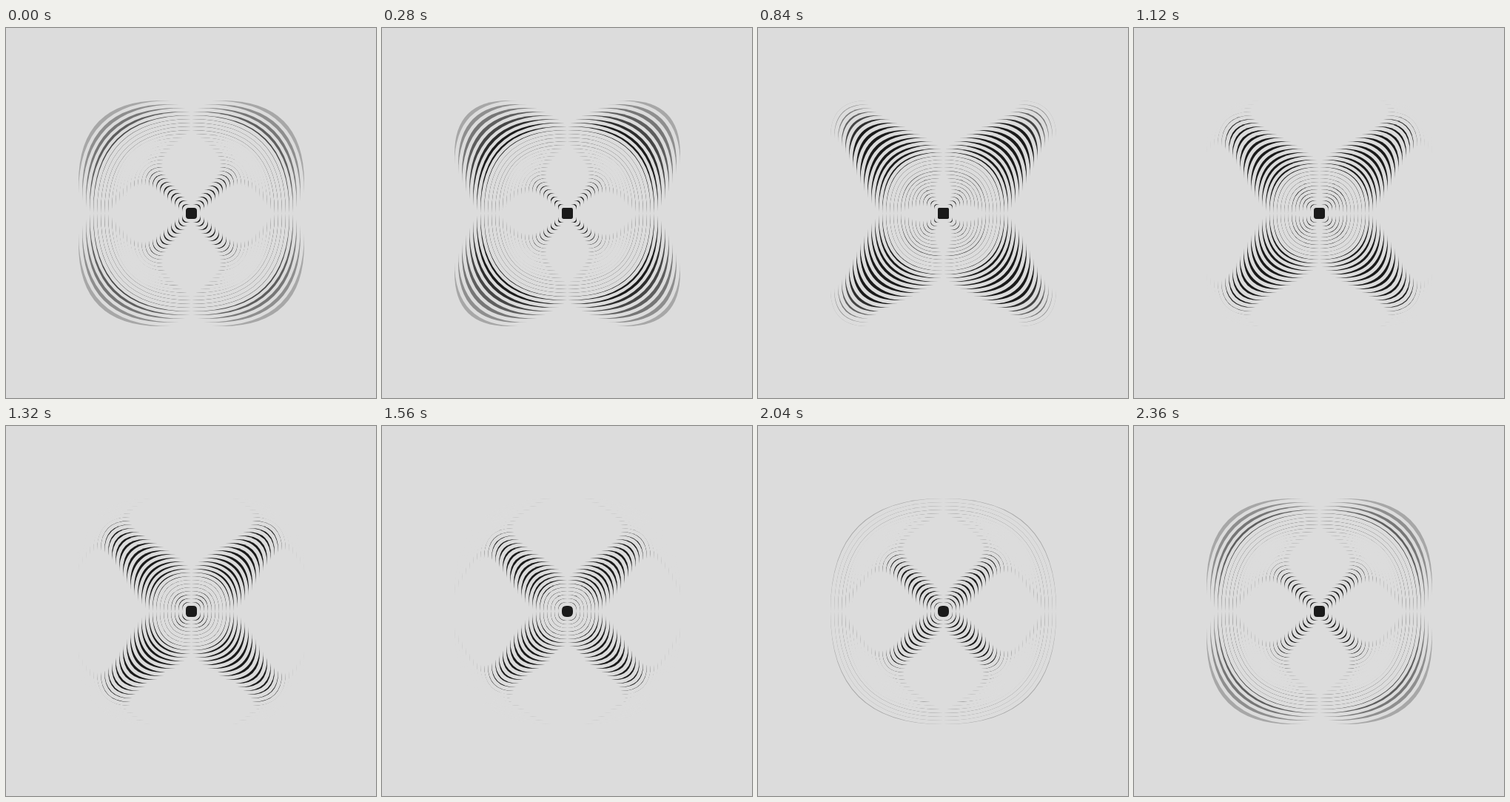
An HTML page that plays this animation: 500 by 500 pixels, repeating every 2.4 s.

```html
<!DOCTYPE html>
<html lang="en">
<head>
<meta charset="utf-8">
<title>Rounded squares</title>
<style>
html, body { margin: 0; width: 100%; height: 100%; overflow: hidden; background: #dcdcdc; }
svg { display: block; width: 100vw; height: 100vh; }
</style>
</head>
<body>
<svg id="stage" viewBox="0 0 500 500"></svg>
<script>
const LOOP = 2400, STEP = 40, COUNT = 30, CENTER = 250.5;
const INK = [26, 26, 26], PAPER = [220, 220, 220];
const stage = document.getElementById('stage');

const mix = k => 'rgb(' + PAPER.map((p, j) => Math.round(p + (INK[j] - p) * k)) + ')';
const clamp = (v, lo, hi) => Math.max(lo, Math.min(hi, v));

function addPath(fill) {
  const path = document.createElementNS('http://www.w3.org/2000/svg', 'path');
  path.setAttribute('fill', fill);
  stage.appendChild(path);
  return path;
}

// Square with quadratic corners
function square(half, radius) {
  const r = clamp(radius, 0, half), a = CENTER - half, b = CENTER + half;
  return `M${a + r} ${a}L${b - r} ${a}Q${b} ${a} ${b} ${a + r}` +
    `L${b} ${b - r}Q${b} ${b} ${b - r} ${b}` +
    `L${a + r} ${b}Q${a} ${b} ${a} ${b - r}` +
    `L${a} ${a + r}Q${a} ${a} ${a + r} ${a}Z`;
}

// Outermost first; each dark square is masked by a paper one of equal size
const rings = [];
for (let i = COUNT - 1; i >= 0; i--) {
  rings.push({
    i,
    half: 7.5 + 5 * i,
    dark: addPath(mix(clamp((31.2 - i) / 8, 0, 1))),
    light: i ? addPath(mix(0)) : null
  });
}

function draw(ms) {
  const turn = ms / LOOP - 0.75;
  const round = i => 0.66 + 0.36 * Math.cos(2 * Math.PI * (turn + i / COUNT));
  for (const { i, half, dark, light } of rings) {
    dark.setAttribute('d', square(half, half * round(i) - 1));
    if (light) light.setAttribute('d', square(half, half * round(i - 1) + 2.5));
  }
}

const start = performance.now();
function tick() {
  const ms = (performance.now() - start) % LOOP;
  draw(Math.floor(ms / STEP) * STEP);
  requestAnimationFrame(tick);
}
draw(0);
requestAnimationFrame(tick);
</script>
</body>
</html>
```
